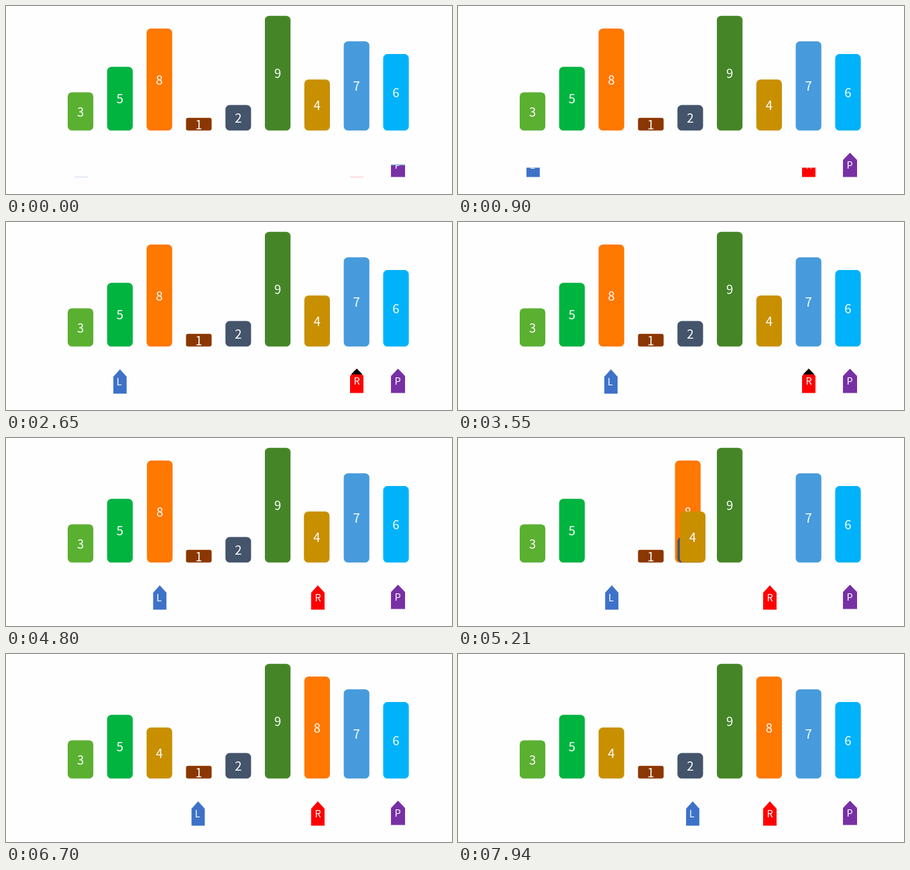
Recreate the animation shown at these times as an HTML page. Size 665 px wide and 282 px high, loop 8000 ms.

```html
<!DOCTYPE html>
<html lang="en">
<head>
<meta charset="utf-8">
<title>Partition step of a quicksort</title>
<style>
  html, body { margin: 0; width: 100%; height: 100%; overflow: hidden; background: #fefefe; }
  svg { display: block; width: 100%; height: 100%; }
  text {
    fill: #fff; text-anchor: middle; font-weight: 300;
    font-family: "Noto Sans CJK SC", "Noto Sans", "Open Sans", sans-serif;
  }
</style>
</head>
<body>
<svg id="stage" viewBox="0 0 665 282"></svg>
<script>
const LOOP = 8000;
const BASE = 186.8, UNIT = 19.12, LEFT = 92, PITCH = 58.8, WIDTH = 38.2;
const TIP = 220, FOOT = 256.4;

const bars = [
  [3, '#5ab031'], [5, '#00b440'], [8, '#ff7800'], [1, '#8b3700'], [2, '#43546b'],
  [9, '#458527'], [4, '#c88f00'], [7, '#479bdc'], [6, '#00b2f9']
];

// Moments at which the picture stands still: [from, until]
const holds = [[4800, 4930], [5070, 5210], [5610, 5740]];

// Horizontal moves: [start, duration, from, to]
const moves = {
  L: [
    [1690, 980, 112, 170],
    [2672, 980, 170, 229.3],
    [5770, 980, 229.3, 286.8],
    [6760, 980, 286.8, 345.5],
    [7750, 980, 345.5, 404.5]
  ],
  R: [[3720, 980, 523, 465]],
  P: [[0, 1, 584.5, 584.5]]
};

const stage = document.getElementById('stage');

function add(parent, tag, attrs, text) {
  const node = document.createElementNS('http://www.w3.org/2000/svg', tag);
  for (const key in attrs) node.setAttribute(key, attrs[key]);
  if (text !== undefined) node.textContent = text;
  parent.appendChild(node);
  return node;
}

const clamp = u => Math.min(1, Math.max(0, u));
const ramp = (t, start, length) => clamp((t - start) / length);
const ease = u => u < 0.5 ? 2 * u * u : 1 - 2 * (1 - u) * (1 - u);

function makeBar([value, color], slot) {
  const height = value * UNIT;
  const g = add(stage, 'g', {});
  add(g, 'rect', {
    x: LEFT + slot * PITCH, y: BASE - height, width: WIDTH, height,
    rx: Math.min(WIDTH, height) / 6, fill: color
  });
  add(g, 'text', {
    x: LEFT + slot * PITCH + WIDTH / 2, y: BASE - height / 2 + 7.4, 'font-size': 18.5
  }, value);
  return g;
}

function makePointer(name, color, half, shift) {
  const outer = add(stage, 'g', {});
  const clip = add(outer, 'clipPath', { id: 'wipe' + name });
  const mask = add(clip, 'rect', { x: -20, width: 40, height: 60 });
  const g = add(outer, 'g', { 'clip-path': `url(#wipe${name})` });
  add(g, 'path', { d: `M0 ${TIP}L${half} 231V${FOOT}H${-half}V231Z`, fill: color });
  const tip = name === 'R' && add(g, 'path', { d: `M0 ${TIP}L8.5 228.5H-8.5Z`, fill: '#000' });
  add(g, 'text', { x: shift, y: 243.6, 'font-size': 14.5 }, name);
  return { name, outer, mask, tip };
}

const barNodes = bars.map(makeBar);
const left = makePointer('L', '#3d72c8', 9.9, -1.2);
const right = makePointer('R', '#ff0000', 10, 0);
const pivot = makePointer('P', '#7830a5', 10.5, -0.5);
const edge = add(stage, 'rect', { x: 574, width: 21, height: 1.4, fill: '#6f9ed6' });

function place(pointer, t, reveal) {
  const path = moves[pointer.name];
  let x = path[0][2];
  for (const [start, length, from, to] of path) {
    if (t >= start) x = from + (to - from) * ease(ramp(t, start, length));
  }
  const moved = pointer !== pivot && t > path[0][0] + 150;
  pointer.outer.setAttribute('transform', `translate(${x} ${moved ? 1 : 0})`);
  const top = FOOT - (FOOT - TIP) * reveal;
  pointer.mask.setAttribute('y', top);
  return top;
}

function draw(time) {
  let t = time % LOOP;
  for (const [from, until] of holds) if (t > from && t < until) t = from;

  const shift = 4 * PITCH * ease(ramp(t, 4768, 900));
  barNodes[2].setAttribute('transform', `translate(${shift} 0)`);
  barNodes[6].setAttribute('transform', `translate(${-shift} 0)`);

  const pair = ramp(t, 560, 900);
  place(left, t, pair);
  place(right, t, pair);
  right.tip.setAttribute('visibility', t < moves.R[0][0] ? 'visible' : 'hidden');

  const top = place(pivot, t, ramp(t, -490, 980));
  edge.setAttribute('y', top - 0.4);
  edge.setAttribute('visibility', top > 231 ? 'visible' : 'hidden');
}

const begin = performance.now();
function tick() {
  draw(performance.now() - begin);
  requestAnimationFrame(tick);
}
draw(0);
requestAnimationFrame(tick);
</script>
</body>
</html>
```
